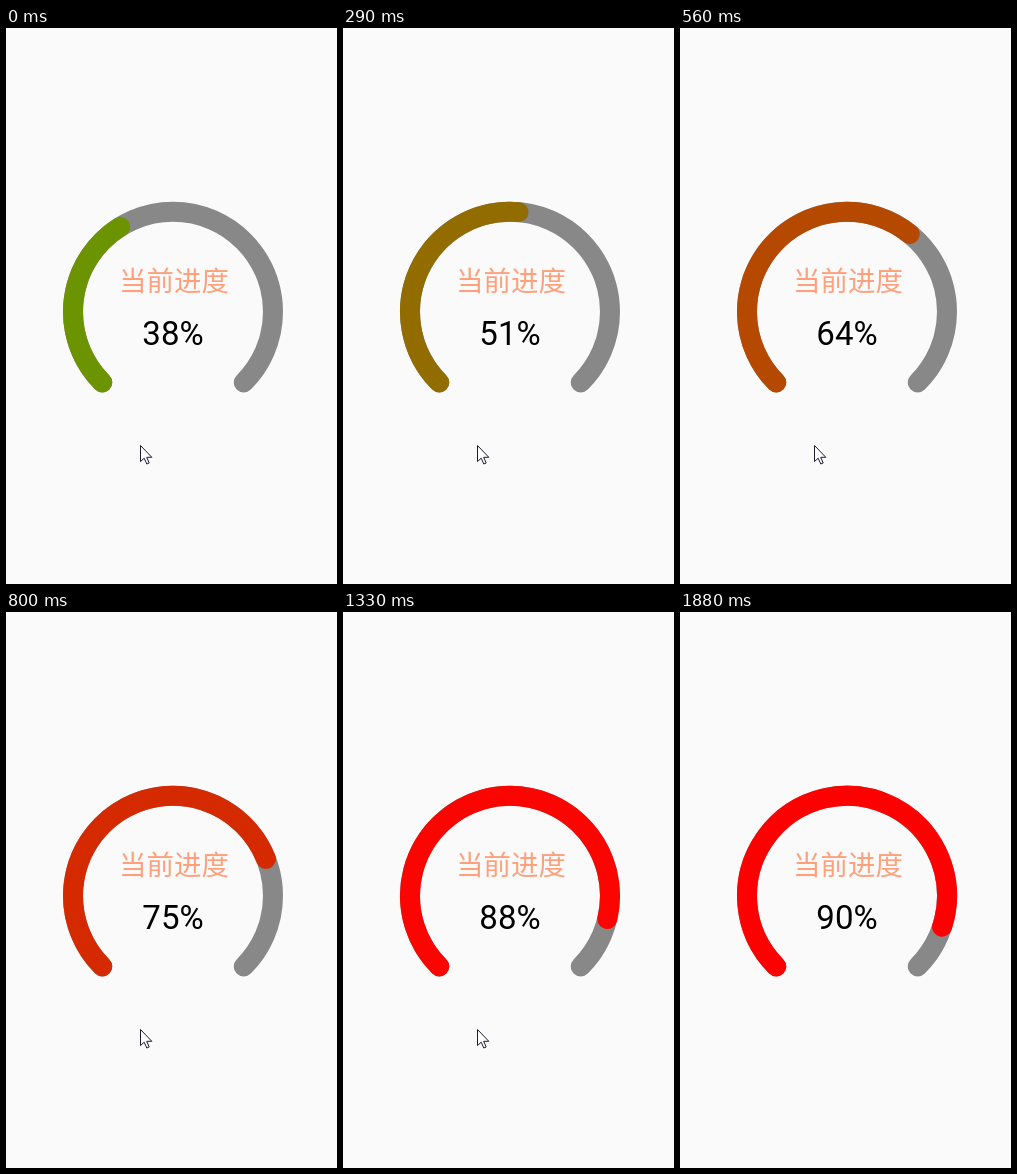
Write an HTML page that moves like this. It is 331x556 px and loops after 2.31 s.

```html
<!DOCTYPE html>
<html lang="zh-CN">
<head>
<meta charset="utf-8">
<title>当前进度</title>
<style>
  html, body { margin: 0; width: 100%; height: 100%; overflow: hidden; background: #fafafa; }
  svg { display: block; width: 100%; height: 100%; }
  .arc { fill: none; stroke-width: 20; stroke-linecap: round; }
  text { text-anchor: middle; }
  .label { font: 500 27.5px "Noto Sans CJK SC", "Noto Sans CJK", sans-serif; fill: #ffa07a; }
  .value { font: 33px Roboto, sans-serif; fill: #000; }
  .cursor { fill: #fff; stroke: #1c1c30; animation: cursor 2310ms step-end infinite; }
  @keyframes cursor { 74.459% { visibility: hidden; } }
</style>
</head>
<body>
<svg viewBox="0 0 331 556">
  <path class="arc" id="track" stroke="#888"/>
  <path class="arc" id="bar"/>
  <text class="label" x="168" y="263">当前进度</text>
  <text class="value" id="value" x="167" y="317"></text>
  <path class="cursor" d="M134.5 417.5V433.5L138.2 430.2L140.8 436L143.2 435L140.7 429.3H145.8Z"/>
</svg>
<script>
  const LOOP = 2310, MAX = 90;
  const CX = 167, CY = 283.8, R = 100;
  // [start in ms, progress in percent]
  const steps = [
    [0, 38.2], [150, 45.2], [290, 51.8], [410, 57.6], [560, 64.4], [680, 70.1], [800, 75.3],
    [950, 80.3], [1070, 83.7], [1190, 86.3], [1330, 88.3], [1450, 89.5], [1570, 90]
  ];
  const [track, bar, value] = ['track', 'bar', 'value'].map(id => document.getElementById(id));

  function point(percent) {
    const a = (135 + percent * 2.7) * Math.PI / 180;
    return `${(CX + R * Math.cos(a)).toFixed(2)} ${(CY + R * Math.sin(a)).toFixed(2)}`;
  }

  function arc(percent) {
    const large = percent * 2.7 > 180 ? 1 : 0;
    return `M${point(0)}A${R} ${R} 0 ${large} 1 ${point(percent)}`;
  }

  function draw(now) {
    const t = now % LOOP;
    const p = steps.findLast(([start]) => start <= t)[1];
    const red = Math.round(255 * p / MAX);
    bar.setAttribute('d', arc(p));
    bar.setAttribute('stroke', `rgb(${red},${255 - red},0)`);
    value.textContent = Math.floor(p) + '%';
  }

  const cursor = document.querySelector('.cursor').getAnimations()[0];
  const begin = performance.now();
  cursor.currentTime = 0;

  function tick() {
    draw(performance.now() - begin);
    requestAnimationFrame(tick);
  }

  track.setAttribute('d', arc(100));
  tick();
</script>
</body>
</html>
```
